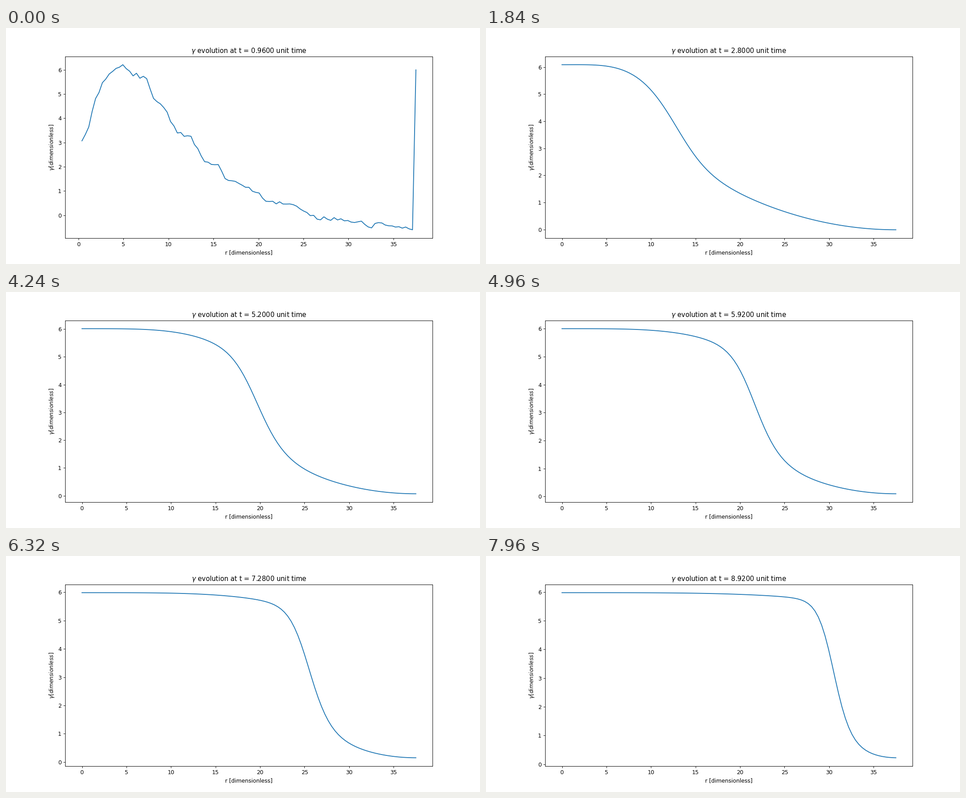
Write a matplotlib script that moves like this. It is 1058x529 px and loops after 8000 ms.

```python
import numpy as np
import matplotlib.pyplot as plt
from matplotlib.animation import FuncAnimation

FRAMES, INTERVAL = 200, 40
T0, DT = 0.96, 0.04
T_SMOOTH = 2.8            # the front is fully smooth from here on
R_MAX = 37.5
r = np.linspace(0, R_MAX, 100)

# Rough starting profile: (cell, value) corners joined by jittered lines
CORNERS = [(1, 3.07), (3, 3.65), (5, 4.79), (7, 5.47), (10, 6.0), (13, 6.15),
           (16, 5.81), (20, 5.65), (22, 4.85), (25, 4.45), (29, 3.43),
           (33, 3.25), (37, 2.17), (41, 2.1), (43, 1.48), (46, 1.43),
           (50, 1.07), (53, 0.9), (55, 0.59), (63, 0.41), (70, -0.13),
           (83, -0.24), (85, -0.58), (88, -0.28), (98, -0.6)]
JITTER = 0.04
EDGE = 6.0
DIFFUSION, FADE = 1.5, 0.35

rng = np.random.default_rng(4)
start = np.interp(np.arange(1, 99), *zip(*CORNERS))
start[1:-1] += rng.normal(0, JITTER, 96)


def front(t):
    """Steepening step that travels outwards between plateau and tail."""
    tau = t - T_SMOOTH
    centre = 14.6 + 2.0 * tau + 0.0975 * tau ** 2
    steepness = 7.6 * np.exp(0.239 * tau)
    sag = 1.6e-5 * np.exp(-0.9 * tau)
    lift = 6.6e-4 + 4e-5 * np.exp(0.59 * tau)
    top = 5.97 + 0.128 * np.exp(-0.45 * tau)
    end = -0.005 + 0.027 * tau + 0.0015 * tau ** 2

    inside = 1 / (1 + (r / centre) ** steepness)
    plateau = 1 / (1 + sag * r ** 4)
    tail = lift * (R_MAX - r) ** 2
    return end + (top - end) * (inside * plateau + (1 - inside) * tail)


def blur(values, sigma):
    """Gaussian smoothing with mirrored edges."""
    n = len(values)
    wide = np.concatenate([values[::-1], values, values[::-1]])
    gap = (np.arange(n)[:, None] + n - np.arange(3 * n)) * r[1]
    kernel = np.exp(-0.5 * (gap / sigma) ** 2)
    return kernel @ wide / kernel.sum(axis=1)


rough = np.concatenate([start[:1], start, start[-1:]]) - front(T0)


def profile(k):
    if k == 0:
        return r[1:], np.append(start, EDGE)
    age = k * DT
    rest = blur(rough, np.sqrt(2 * DIFFUSION * age)) * np.exp(-age / FADE)
    return r, front(T0 + age) + rest


def padded(values):
    pad = 0.05 * np.ptp(values)
    return values.min() - pad, values.max() + pad


fig, ax = plt.subplots(figsize=(12, 6), dpi=88.16667)
fig.subplots_adjust(top=0.8795)
line, = ax.plot([], [], color="#1f77b4", lw=1.5)
ax.set_xlabel("r [dimensionless]")
ax.set_ylabel(r"$\gamma [dimensionless]$")
title = ax.set_title("")


def update(k):
    x, y = profile(k)
    line.set_data(x, y)
    ax.set_xlim(*padded(x))
    ax.set_ylim(*padded(y))
    title.set_text(
        rf"$\gamma$ evolution at t = {T0 + k * DT:.4f} unit time")
    return line, title


anim = FuncAnimation(fig, update, frames=FRAMES, interval=INTERVAL,
                     repeat=True, repeat_delay=0, blit=False)
plt.show()
```
